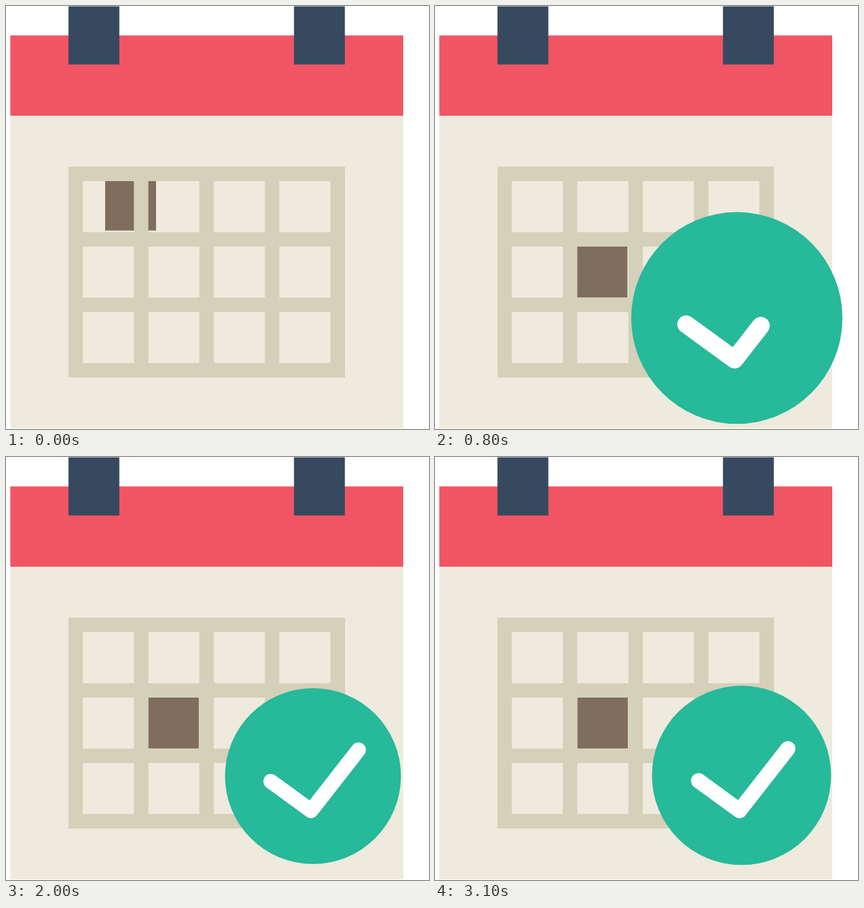
These frames come from a looping animation (640x640 px, 3200 ms). An HTML page:

```html
<!DOCTYPE html>
<html lang="en">
<head>
<meta charset="utf-8">
<title>Calendar check</title>
<style>
  html, body { margin: 0; height: 100%; overflow: hidden; background: #fff; }
  svg { display: block; width: 100vw; height: 100vh; }
</style>
</head>
<body>
<svg viewBox="0 0 640 640">
  <defs><clipPath id="cells"></clipPath></defs>
  <path fill="#eeeadd" d="M6.5 166H601V639H6.5z"/>
  <path fill="#f15564" d="M6.5 44.5H601V166H6.5z"/>
  <path fill="#36495e" d="M94.5 .5h77v88h-77zM435.7 .5h77v88h-77z"/>
  <path fill="#d4d0b9" d="M94.5 243H513V562H94.5z"/>
  <g id="days" fill="#eeeadd"></g>
  <g clip-path="url(#cells)" fill="#7f6d5d">
    <rect id="topMarker" y="265" width="77" height="74.7"/>
    <rect id="dayMarker" y="364" width="76.5" height="77"/>
  </g>
  <g id="badge">
    <ellipse id="disc" rx="1" fill="#26b99a"/>
    <path id="tick" d="M-.479 .06L-.022 .393L.517 -.298" pathLength="1" fill="none"
      stroke="#fff" stroke-width=".17" stroke-linecap="round" stroke-linejoin="round"/>
  </g>
</svg>
<script>
const LOOP = 3200, STEP = 100;
const $ = id => document.getElementById(id);
const set = (id, attrs) => {
  for (const name in attrs) $(id).setAttribute(name, attrs[name]);
};
const clamp = v => Math.min(1, Math.max(0, v));

for (let i = 0; i < 12; i++) {
  const x = 116.2 + (i % 4) * 99.1, y = 265 + Math.floor(i / 4) * 99;
  const cell = `<rect x="${x}" y="${y}" width="77.3" height="77.2"/>`;
  $("days").innerHTML += cell;
  $("cells").innerHTML += cell;
}

// Damped swing around rest, with its first peak close to 0.7 s.
function swing(t, rest, cosine, sine) {
  const s = t - 0.7, angle = s * Math.PI * 2.5;
  return rest + Math.exp(-2 * s) * (cosine * Math.cos(angle) + sine * Math.sin(angle));
}

function badgePose(t) {
  if (t < 0.4) {
    const r = 81 * clamp((t - 0.2) / 0.2);
    return { r, ry: r, cy: 536.8 - 0.405 * r };
  }
  const s = t - 0.7;
  const r = swing(t, 135.3, 28.5, 13.8);
  const stretch = 12 * Math.exp(-2 * s) * Math.cos(s * Math.PI * 2.5) ** 9;
  return { r, ry: r + stretch, cy: swing(t, 481.9, -20.7, 3.7) };
}

function draw(t) {
  set("topMarker", { x: 150 + 671 * t });
  set("dayMarker", { x: 215.3 - 28.3 * Math.exp(-9.3 * (t - 0.4)) });

  const { r, ry, cy } = badgePose(t);
  set("badge", {
    transform: `translate(${503.2 - 0.291 * r} ${cy}) scale(${r})`,
    visibility: r > 0 ? "visible" : "hidden"
  });
  set("disc", { ry: r > 0 ? ry / r : 1 });

  const drawn = clamp((t - 0.5) / 0.446);
  set("tick", {
    "stroke-dasharray": drawn < 1 ? `${drawn} 2` : "none",
    visibility: drawn > 0 && r > 0 ? "visible" : "hidden"
  });
}

const start = performance.now();
function frame() {
  const elapsed = (performance.now() - start) % LOOP;
  draw(Math.floor(elapsed / STEP) * STEP / 1000);
  requestAnimationFrame(frame);
}
frame();
</script>
</body>
</html>
```
